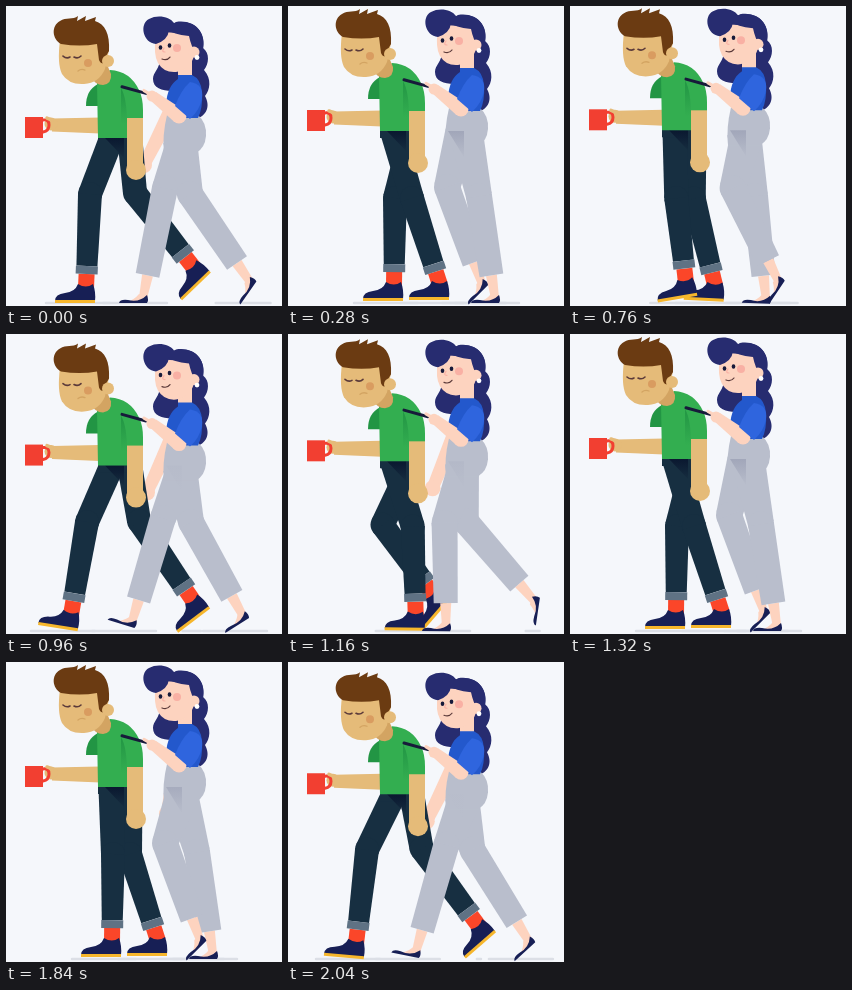
An HTML page with a canvas that plays this animation: 276x300 px, repeating every 2.08 s.

```html
<!DOCTYPE html>
<html lang="en">
<head>
<meta charset="utf-8">
<title>Walking couple</title>
<style>
  html, body { margin: 0; width: 100%; height: 100%; overflow: hidden; background: #f5f7fb; }
  canvas { display: block; width: 276px; height: 300px; }
</style>
</head>
<body>
<canvas id="stage"></canvas>
<script>
const W = 276, H = 300, CYCLE = 1040, STEP = CYCLE / 2, TICK = 40;
const canvas = document.getElementById('stage');
const ctx = canvas.getContext('2d');
const scale = window.devicePixelRatio || 1;
canvas.width = W * scale;
canvas.height = H * scale;

const C = {
  bg: '#f5f7fb', ground: '#dcdfe6',
  tan: '#e5bb79', tanDark: '#d3a462', brown: '#6b3b12', lid: '#5b3a3a', blush: '#d99c60',
  green: '#33ae50', greenDark: '#229544', navy: '#172f41', cuff: '#5f7284',
  red: '#f23f31', sock: '#fb4629', shoe: '#171f55', sole: '#f6b62c',
  peach: '#fdd3bf', pink: '#f9b0a4', hair: '#272c70', blue: '#2358cc', blueLight: '#2f65de',
  pants: '#b9becc', pantsDark: '#8f94ab', phone: '#171a3a'
};

// Leg poses over one cycle: time, knee x, y, ankle x, y, foot angle in degrees
const manGait = [
  [0, 84, 188, 80, 282, 0],
  [80, 121, 192, 119, 282, 0],
  [280, 124, 192, 152, 279, 0],
  [440, 133, 187, 188, 268, -37],
  [520, 129, 187, 188, 262, -44],
  [600, 95, 190, 157, 258, -58],
  [800, 107, 192, 106, 280, 0],
  [960, 81, 188, 65, 281, 9]
];
const womanGait = [
  [0, 159, 182, 137, 292, 0],
  [80, 150, 188, 147, 292, 0],
  [280, 191, 190, 207, 292, 0],
  [440, 185, 188, 237, 282, -32],
  [520, 184, 188, 244, 276, -55],
  [600, 182, 189, 255, 266, -85],
  [800, 159, 181, 194, 278, -45],
  [960, 157, 184, 126, 288, 17]
];

const mod = (a, n) => ((a % n) + n) % n;

// Smooth periodic curve through the poses
function pose(keys, time) {
  const t = mod(time, CYCLE), n = keys.length;
  let i = n - 1;
  while (keys[i][0] > t) i--;
  const at = k => keys[mod(k, n)];
  const when = k => at(k)[0] + Math.floor(k / n) * CYCLE;
  const span = when(i + 1) - when(i), u = (t - when(i)) / span;
  const slope = (k, c) => (at(k + 1)[c] - at(k - 1)[c]) / (when(k + 1) - when(k - 1)) * span;
  return [1, 2, 3, 4, 5].map(c => {
    const a = at(i)[c], b = at(i + 1)[c];
    const m = slope(i, c), k = slope(i + 1, c);
    return a + u * (m + u * (3 * (b - a) - 2 * m - k + u * (2 * (a - b) + m + k)));
  });
}

function fill(d, color) {
  ctx.fillStyle = color;
  ctx.fill(new Path2D(d));
}

function line(d, color, width) {
  ctx.strokeStyle = color;
  ctx.lineWidth = width;
  ctx.lineCap = 'round';
  ctx.stroke(new Path2D(d));
}

function dot(x, y, rx, color, ry = rx) {
  ctx.fillStyle = color;
  ctx.beginPath();
  ctx.ellipse(x, y, rx, ry, 0, 0, 7);
  ctx.fill();
}

// Tapered bar from a to b with flat ends
function bar(a, b, wa, wb, color) {
  const len = Math.hypot(b[0] - a[0], b[1] - a[1]) || 1;
  const nx = (a[1] - b[1]) / len / 2, ny = (b[0] - a[0]) / len / 2;
  ctx.fillStyle = color;
  ctx.beginPath();
  ctx.moveTo(a[0] + nx * wa, a[1] + ny * wa);
  ctx.lineTo(b[0] + nx * wb, b[1] + ny * wb);
  ctx.lineTo(b[0] - nx * wb, b[1] - ny * wb);
  ctx.lineTo(a[0] - nx * wa, a[1] - ny * wa);
  ctx.fill();
}

// Point at a distance from a towards b
function along(a, b, dist) {
  const k = dist / Math.hypot(b[0] - a[0], b[1] - a[1]);
  return [a[0] + (b[0] - a[0]) * k, a[1] + (b[1] - a[1]) * k];
}

function placed(x, y, deg, draw) {
  ctx.save();
  ctx.translate(x, y);
  ctx.rotate(deg * Math.PI / 180);
  draw();
  ctx.restore();
}

function trouser(hip, knee, hem, [wHip, wKnee, wHem], color) {
  bar(hip, knee, wHip, wKnee, color);
  dot(...knee, wKnee / 2, color);
  bar(knee, hem, wKnee, wHem, color);
}

// Shadow under a foot, shrinking as the foot lifts
function footShadow(gait, t) {
  const [, , x, y] = pose(gait, t);
  const k = Math.min(1, (y - 264) / 14);
  if (k > 0) line(`M${x - 40 * k} 297 H${x + 24 * k}`, C.ground, 2.4);
}

function manLeg(t, hip) {
  const [kx, ky, x, y, deg] = pose(manGait, t);
  const knee = [kx, ky], ankle = [x, y];
  const hem = along(ankle, knee, 14), fold = along(ankle, knee, 22);
  bar(hem, ankle, 16, 16, C.sock);
  placed(x, y, deg, () => {
    fill('M-8 -4 Q0 1 7 -4 Q10 4 9 13 H-31 Q-31 6 -21 5 Q-11 4 -8 -4Z', C.shoe);
    fill('M-31 12 H9 V15 H-31Z', C.sole);
  });
  trouser(hip, knee, fold, [25, 24, 21], C.navy);
  bar(fold, hem, 22, 22, C.cuff);
}

function womanLeg(t, hip) {
  const [kx, ky, x, y, deg] = pose(womanGait, t);
  const knee = [kx, ky], ankle = [x, y];
  const hem = along(ankle, knee, 23);
  bar(hem, ankle, 11, 8, C.peach);
  placed(x, y, deg, () => {
    fill('M-4 -4 L4 -3 V4 H-16 Q-9 2 -4 -4Z', C.peach);
    fill('M4 -3 Q6 2 4 5 H-24 Q-23 1 -15 2 Q-4 5 4 -3Z', C.shoe);
  });
  trouser(hip, knee, hem, [34, 26, 24], C.pants);
}

function lifted(b, draw) {
  ctx.save();
  ctx.translate(0, b);
  draw();
  ctx.restore();
}

function shade(d, y0, y1, color) {
  const g = ctx.createLinearGradient(0, y0, 0, y1);
  g.addColorStop(0, color);
  g.addColorStop(1, color + '00');
  fill(d, g);
}

function mugArm() {
  bar([94, 119.5], [46, 119], 16, 13, C.tan);
  dot(45, 118, 6.5, C.tan);
  line('M37 114 Q43 113 43 119 Q43 125 37 126', C.red, 3);
  line('M41 112 L46 114', C.tan, 3.5);
  fill('M19 111 H37 V132 H19Z', C.red);
}

function manTop() {
  fill('M92 78 Q80 84 80 100 H93Z', C.greenDark);
  fill('M91 76 L104 64 Q124 65 133 84 Q137 92 137 104 V132 H92Z', C.green);
  fill('M84 70 L100 56 L105 68 Q106 78 97 79 Q89 79 84 70Z', C.tanDark);
  shade('M115 82 Q121 92 121 118 H115Z', 82, 118, C.greenDark);
  bar([129, 112], [129, 163], 16, 16, C.tan);
  dot(130, 164, 10, C.tan);
}

function manHead() {
  fill('M54 34 Q51 58 56 68 Q63 79 78 78 Q93 77 99 63 L103 44 L96 30Z', C.tan);
  fill('M55 38 C46 33 45 20 54 15 C60 11 67 14 72 10 L71 15 L80 10 L79 15 L90 11 L89 15 C99 18 104 28 103 45 L100 50 V57 Q95 59 93 54 L91 38 Q74 41 55 38Z', C.brown);
  dot(102, 55, 6, C.tan);
  dot(82, 57, 4, C.blush);
  line('M57 50 Q60.5 53 64 51', C.lid, 1.6);
  line('M68 51 Q72 53 75 50', C.lid, 1.6);
  line('M72 65 Q75 62.5 79 64', C.tanDark, 1.3);
}

function womanHairBack() {
  fill('M150 30 L170 16 C187 13 200 25 197 42 C204 47 203 58 198 64 C206 73 204 84 199 90 C205 101 200 110 190 113 L176 84 C163 86 147 85 147 73 C147 66 154 63 154 52Z', C.hair);
}

function womanTop() {
  fill('M172 54 H186 V73 H172Z', C.peach);
  fill('M172 69 H186 Q195 73 196 86 Q197 102 192 112 H165 L166 99 H160 Q161 80 172 73Z', C.blue);
}

function phoneArm() {
  line('M116 80.8 L140 87.4', C.phone, 3);
  bar([173, 110], [147, 90], 15, 10, C.peach);
  dot(173, 110, 7.5, C.peach);
  dot(146, 90, 5.5, C.peach);
  line('M144 88 L138 84.5', C.peach, 3.2);
  fill('M184 76 Q198 78 196 92 Q194 104 184 113 L169 100 Q175 84 184 76Z', C.blueLight);
}

function womanHead() {
  fill('M150 32 Q147 48 152 57 Q158 67 170 66 Q184 64 188 50 L188 28 L156 26Z', C.peach);
  fill('M150 38 C137 37 133 18 143 13 C152 8 164 11 168 17 C187 12 201 25 197 44 L190 48 Q185 40 183 30 Q166 28 163 24 Q162 34 150 38Z', C.hair);
  dot(188, 46, 5.5, C.peach);
  dot(191, 51.5, 2.4, '#ffffff');
  dot(171, 42, 4, C.pink);
  dot(154.5, 41.5, 1.8, C.phone, 2.3);
  dot(163.5, 39.5, 1.8, C.phone, 2.3);
  line('M158 42 Q155 46 159 46', C.pink, 1.2);
  line('M156 53 Q161 55 164 51', C.lid, 1.2);
}

function draw(t) {
  const bob = 4 * (Math.cos(2 * Math.PI * (t + 30) / STEP) - 0.93);
  const swing = Math.cos(2 * Math.PI * t / CYCLE);

  ctx.setTransform(scale, 0, 0, scale, 0, 0);
  ctx.fillStyle = C.bg;
  ctx.fillRect(0, 0, W, H);
  for (const gait of [manGait, womanGait]) {
    footShadow(gait, t);
    footShadow(gait, t + STEP);
  }

  lifted(bob, () => {
    womanHairBack();
    const shoulder = [174, 88], hand = [164 - 26 * swing, 159];
    bar(shoulder, hand, 17, 12, C.peach);
    dot(...hand, 8, C.peach);
    mugArm();
  });

  manLeg(t + STEP, [124, 134 + bob]);
  manLeg(t, [105, 134 + bob]);
  lifted(bob, () => {
    fill('M92 128 H136 V139 H92Z', C.navy);
    shade('M99 132 H118 V152 Z', 132, 154, '#0a1830');
    manTop();
    manHead();
  });

  womanLeg(t + STEP, [174, 134 + bob]);
  womanLeg(t, [178, 134 + bob]);
  lifted(bob, () => {
    fill('M161 109 H192 Q201 117 200 130 Q199 142 190 147 H158 Q156 130 161 109Z', C.pants);
    ctx.globalAlpha = (1 - swing) / 2;
    shade('M160 132 H176 V158 Z', 132, 160, C.pantsDark);
    ctx.globalAlpha = 1;
    womanTop();
    phoneArm();
    womanHead();
  });
}

const start = performance.now();
function frame() {
  const t = Math.floor((performance.now() - start) / TICK) * TICK;
  draw(t % CYCLE);
  requestAnimationFrame(frame);
}
frame();
</script>
</body>
</html>
```
